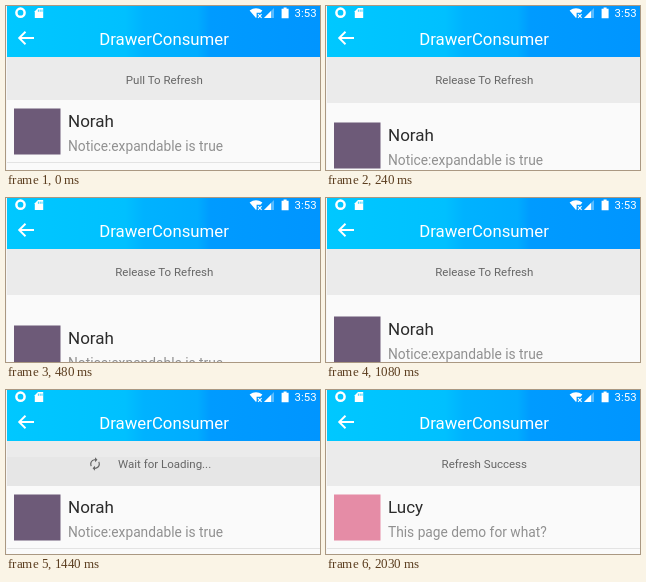
Animation of 314x164 px, one loop 2.24 s. Source, as an HTML page:

```html
<!DOCTYPE html>
<html lang="en">
<head>
<meta charset="utf-8">
<title>Pull to refresh</title>
<style>
html, body { margin: 0; width: 100%; height: 100%; overflow: hidden; background: #fafafa; }
svg { display: block; width: 100vw; height: 100vh; }
text { font-family: Roboto, sans-serif; }
.hint { font-size: 11.5px; fill: #666; }
.name { font-size: 17px; fill: #2b2b2b; }
.note { font-size: 13.75px; fill: #909090; }
</style>
</head>
<body>
<svg viewBox="0 0 314 164">
  <defs>
    <linearGradient id="sky" gradientUnits="userSpaceOnUse" x1="0" y1="0" x2="314" y2="0">
      <stop offset="0" stop-color="#00c8ff"/>
      <stop offset=".38" stop-color="#00c0ff"/>
      <stop offset=".44" stop-color="#00b2ff"/>
      <stop offset=".61" stop-color="#00acff"/>
      <stop offset=".65" stop-color="#009bff"/>
      <stop offset="1" stop-color="#0095ff"/>
    </linearGradient>
  </defs>

  <rect width="314" height="164" fill="#fafafa"/>
  <rect y="51" width="314" height="46" fill="#ebebeb"/>
  <rect id="shade" y="67" width="314" height="30" fill="#e6e6e6"/>
  <text id="hint" class="hint" y="78.4"></text>
  <g id="spin" fill="#666">
    <path transform="translate(-7.3 -7.3) scale(.61)" d="M12 6v3l4-4-4-4v3c-4.42 0-8 3.58-8 8 0 1.57.46 3.03 1.24 4.26L6.7 14.8A5.87 5.87 0 0 1 6 12c0-3.31 2.69-6 6-6zm6.76 1.74L17.3 9.2c.44.84.7 1.79.7 2.8 0 3.31-2.69 6-6 6v-3l-4 4 4 4v-3c4.42 0 8-3.58 8-8 0-1.57-.46-3.03-1.24-4.26z"/>
  </g>

  <g id="list">
    <rect width="314" height="164" fill="#fafafa"/>
    <rect id="face" x="8" y="8.5" width="46.5" height="46"/>
    <text id="name" class="name" x="62" y="27"></text>
    <text id="note" class="note" x="62" y="51"></text>
    <rect y="62" width="314" height="1" fill="#e3e3e3"/>
  </g>

  <rect width="314" height="51" fill="url(#sky)"/>
  <g fill="#fff">
    <circle cx="14.5" cy="6.7" r="4.1" fill="none" stroke="#fff" stroke-width="2.5"/>
    <path d="M32 2h5.2v10h-8.4V5.2z"/>
    <path d="M32.4 3.6v2.2m1.8-2.2v2.2m1.8-2.2v2.2" stroke="#00c6ff" stroke-width=".8"/>
    <path d="M243.6 4.6Q250 -.2 256.4 4.6L254.6 6.8H250.6V11.2L250 12z"/>
    <path d="M252 8.2l3.6 3.6m0-3.6l-3.6 3.6" stroke="#fff" stroke-width="1.1"/>
    <path d="M268 2v10h-10z" opacity=".35"/>
    <path d="M265 5v7h-7z"/>
    <path d="M277.6 1.6h3v1.2h2v9.4h-7V2.8h2z"/>
    <text x="288.6" y="10.8" font-size="11.4">3:53</text>
    <text x="93.2" y="39" font-size="16.8">DrawerConsumer</text>
  </g>
  <path d="M28 32H13.5M19.5 25.8L13.2 32l6.3 6.2" fill="none" stroke="#fff" stroke-width="1.9"/>
  <rect width="1" height="164" fill="#f6f6f6"/>
</svg>
<script>
const LOOP = 2240;
const LOADING = 1440, DONE = 2030;
// [time, top of list]: drag down, hold, release
const pulls = [[0, 94], [120, 101], [240, 108], [360, 114], [480, 119],
  [1080, 110], [1200, 103], [1320, 99], [LOADING, 96]];
const turns = [[LOADING, 0], [1560, 20], [1670, 40], [1790, 60]];

const el = id => document.getElementById(id);
const hold = (keys, t) => keys.reduce((v, [at, next]) => t >= at ? next : v, keys[0][1]);
const show = (id, on) => el(id).setAttribute("visibility", on ? "visible" : "hidden");
function write(id, value) {
  if (el(id).textContent !== value) el(id).textContent = value;
}

function draw(t) {
  const top = hold(pulls, t);
  const done = t >= DONE;
  const loading = t >= LOADING && !done;

  el("list").setAttribute("transform", `translate(0 ${top})`);
  el("face").setAttribute("fill", done ? "#e58ca6" : "#6d5a78");
  write("name", done ? "Lucy" : "Norah");
  write("note", done ? "This page demo for what?" : "Notice:expandable is true");

  write("hint", done ? "Refresh Success" : loading ? "Wait for Loading..."
    : top < 97 ? "Pull To Refresh" : "Release To Refresh");
  el("hint").setAttribute("x", loading ? 112 : 158.3);
  el("hint").setAttribute("text-anchor", loading ? "start" : "middle");

  show("shade", loading);
  show("spin", loading);
  el("spin").setAttribute("transform", `translate(89 74) rotate(${hold(turns, t)})`);
}

const start = performance.now();
function tick() {
  draw((performance.now() - start) % LOOP);
  requestAnimationFrame(tick);
}
tick();
</script>
</body>
</html>
```
